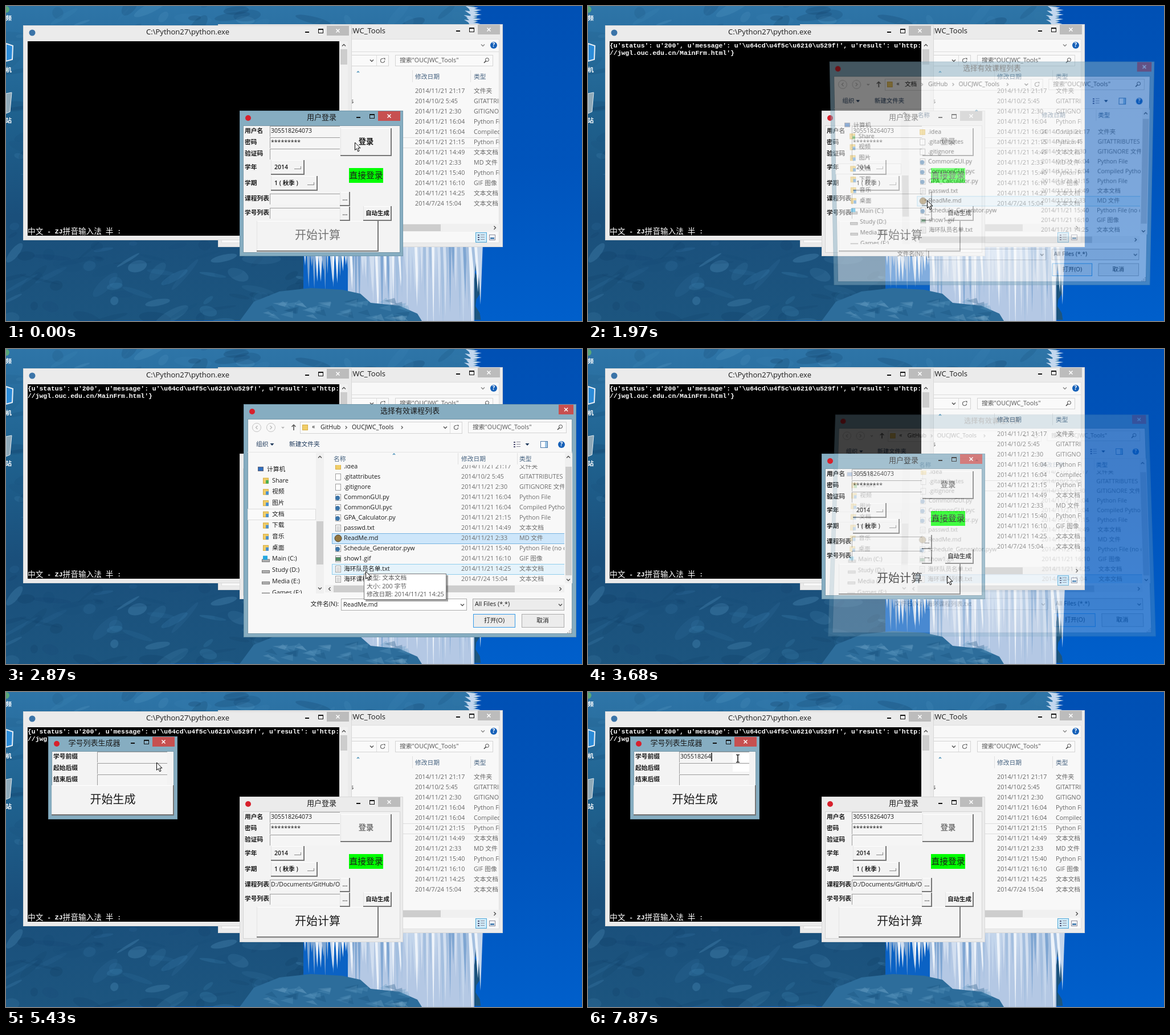
Write an HTML page with a canvas that moves like this. It is 1011 px wide and 554 px high and loops after 8000 ms.

```html
<!DOCTYPE html>
<html lang="zh">
<head>
<meta charset="utf-8">
<title>用户登录</title>
<style>
html, body { margin: 0; width: 100%; height: 100%; overflow: hidden; background: #0057c0; }
canvas { position: absolute; left: 0; top: 0; }
</style>
</head>
<body>
<script>
const W = 1011, H = 554, LOOP = 8000;
const UI = '"Open Sans", "Noto Sans CJK SC", sans-serif';
const MONO = '"Liberation Mono", "Noto Sans CJK SC", monospace';
const ACCENT = '#86adc1', FACE = '#f3f3f3', INK = '#1a1a1a';
const USER = '305518264073', PREFIX = USER.slice(0, 9);

// Bursts of picture changes: first time, last time, number of steps.
const BURSTS = [[0, 0, 1], [160, 700, 5], [1000, 1240, 3], [1390, 1660, 3], [1970, 2870, 8],
  [3020, 3680, 6], [3800, 3920, 2], [4070, 5000, 8], [5150, 5430, 3], [5580, 5860, 3],
  [6450, 6450, 1], [6730, 7720, 8], [7870, 7870, 1]];
const TICKS = BURSTS.flatMap(([from, to, n]) =>
  Array.from({ length: n }, (_, i) => from + (to - from) * i / Math.max(1, n - 1)));

// Pointer path: time, x, y.
const PATH = [[0, 612, 240], [1000, 610, 246], [1240, 588, 347], [1510, 594, 343], [1970, 595, 342],
  [2360, 597, 340], [2870, 631, 391], [3140, 630, 399], [4070, 630, 399], [4500, 648, 360],
  [5000, 648, 360], [5430, 264, 124], [5580, 263, 117], [LOOP, 263, 117]];

const FILES = [
  ['.idea', '2014/11/21 21:17', '文件夹', 'folder'],
  ['.gitattributes', '2014/10/2 5:45', 'GITATTRIBUTES 文件'],
  ['.gitignore', '2014/11/21 2:30', 'GITIGNORE 文件'],
  ['CommonGUI.py', '2014/11/21 16:04', 'Python File', '#3b74a8'],
  ['CommonGUI.pyc', '2014/11/21 16:04', 'Compiled Python File', '#3b74a8'],
  ['GPA_Calculator.py', '2014/11/21 21:15', 'Python File', '#3b74a8'],
  ['passwd.txt', '2014/11/21 14:49', '文本文档', 'lines'],
  ['ReadMe.md', '2014/11/21 2:33', 'MD 文件', 'ball'],
  ['Schedule_Generator.pyw', '2014/11/21 15:40', 'Python File (no console)', '#3b74a8'],
  ['show1.gif', '2014/11/21 16:10', 'GIF 图像', 'image'],
  ['海环队员名单.txt', '2014/11/21 14:25', '文本文档', 'lines'],
  ['海环课程列表.txt', '2014/7/24 15:04', '文本文档', 'lines']];
const PLACES = ['计算机', 'Share', '视频', '图片', '文档', '下载', '音乐', '桌面',
  'Main (C:)', 'Study (D:)', 'Media (E:)', 'Games (F:)'];

const clamp = v => Math.min(1, Math.max(0, v));
let g;
const [desk, consoleLayer, loginLayer, dialogLayer, makerLayer, pointerLayer] = Array.from({ length: 6 }, () => {
  const canvas = document.body.appendChild(document.createElement('canvas'));
  canvas.width = W;
  canvas.height = H;
  return canvas.getContext('2d');
});

function begin(layer) {
  g = layer;
  g.clearRect(0, 0, W, H);
  g.textBaseline = 'middle';
}
function text(str, x, y, { size = 10.75, color = INK, weight = 400, align = 'left', family = UI } = {}) {
  g.font = `${weight} ${size}px ${family}`;
  g.fillStyle = color;
  g.textAlign = align;
  g.fillText(str, x, y);
}
function box(x, y, x2, y2, fill, stroke) {
  if (fill) { g.fillStyle = fill; g.fillRect(x, y, x2 - x, y2 - y); }
  if (stroke) { g.strokeStyle = stroke; g.lineWidth = 1; g.strokeRect(x + .5, y + .5, x2 - x - 1, y2 - y - 1); }
}
function trace(points, stroke, fill, width = 1) {
  g.beginPath();
  points.forEach(([x, y]) => g.lineTo(x, y));
  if (fill) { g.closePath(); g.fillStyle = fill; g.fill(); }
  if (stroke) { g.strokeStyle = stroke; g.lineWidth = width; g.stroke(); }
}
function circle(x, y, r, fill, stroke) {
  g.beginPath();
  g.arc(x, y, r, 0, 7);
  if (fill) { g.fillStyle = fill; g.fill(); }
  if (stroke) { g.strokeStyle = stroke; g.lineWidth = 1; g.stroke(); }
}
function clipped(x, y, x2, y2, draw) {
  g.save();
  g.beginPath();
  g.rect(x, y, x2 - x, y2 - y);
  g.clip();
  draw();
  g.restore();
}
// Quarter turns: 0 down, 1 left, 2 up, 3 right.
function chevron(x, y, turn = 0, color = '#505050', size = 3) {
  g.save();
  g.translate(x, y);
  g.rotate(turn * Math.PI / 2);
  trace([[-size, -size / 2], [0, size / 2], [size, -size / 2]], color, null, 1.4);
  g.restore();
}
const dropMark = (x, y) => trace([[x - 3.5, y - 2], [x + 3.5, y - 2], [x, y + 2]], null, '#1e395b');
function magnifier(x, y) {
  circle(x + 1.5, y - 1.5, 3, null, '#444');
  trace([[x - .5, y + .5], [x - 4, y + 4]], '#444', null, 1.6);
}
function refresh(x, y) {
  g.beginPath();
  g.arc(x, y, 3.5, 0, 5);
  g.strokeStyle = '#666';
  g.lineWidth = 1.2;
  g.stroke();
  trace([[x + 1, y - 4.5], [x + 4.5, y - 4.5], [x + 4.5, y - 1]], null, '#666');
}
function help(x, y) {
  circle(x, y, 6, '#1560b8');
  text('?', x, y, { color: '#fff', weight: 700, size: 10, align: 'center' });
}
function searchBox(x, y, x2) {
  box(x, y, x2, y + 20, '#fafafa', '#d4d4d4');
  text('搜索"OUCJWC_Tools"', x + 8, y + 10, { color: '#555' });
  magnifier(x2 - 12, y + 10);
}
function listView(x, y) {
  for (let i = -1; i < 2; i++) {
    box(x - 6, y + i * 4 - 1, x - 3, y + i * 4 + 1, '#557');
    box(x - 1, y + i * 4 - 1, x + 6, y + i * 4, '#889');
  }
}

function frame(x, y, x2, y2, title, titleX, { active = true, icon, closeWidth = 39, size = 13 } = {}) {
  box(x, y, x2, y2, active ? ACCENT : '#ebebeb', active ? '#6f97ab' : '#d8d8d8');
  const left = x2 - 5 - closeWidth, mid = y + 9.5;
  box(left, y + 1, x2 - 5, y + 18, active ? '#c75050' : '#bcbcbc');
  const cx = left + closeWidth / 2;
  for (const d of [-3, 3]) trace([[cx - 3, mid - d], [cx + 3, mid + d]], '#fff', null, 1.5);
  if (closeWidth > 30) {
    box(left - 38, y + 11, left - 31, y + 13, '#111');
    box(left - 15, y + 6, left - 6, y + 14, null, '#111');
    box(left - 15, y + 6, left - 6, y + 8, '#111');
  }
  if (icon) circle(x + 15, y + 13, 5, icon);
  text(title, titleX, y + 13, { size, align: 'center' });
}
function raised(x, y, x2, y2, sunken) {
  box(x, y, x2, y2, FACE);
  box(x, y, x2, y + 1, sunken ? '#777' : '#fff');
  box(x, y, x + 1, y2, sunken ? '#777' : '#e4e4e4');
  if (sunken) return;
  box(x, y2 - 2, x2, y2, '#777');
  box(x2 - 2, y, x2, y2, '#777');
}
function button(x, y, x2, y2, label, style, sunken) {
  raised(x, y, x2, y2, sunken);
  text(label, (x + x2) / 2, (y + y2) / 2, { align: 'center', weight: 600, ...style });
}
function field(label, labelX, x, y, value = '') {
  text(label, labelX, y + 9, { weight: 600 });
  box(x, y, x + 123, y + 19, '#f5f5f5');
  box(x, y, x + 123, y + 1, '#9c9c9c');
  box(x, y, x + 1, y + 19, '#9c9c9c');
  clipped(x, y, x + 123, y + 19, () => text(value, x + 2, y + 9, { size: 10.5, weight: 500 }));
}
function option(label, y, x2, value) {
  text(label, 419, y + 13, { weight: 600 });
  raised(465, y, x2, y + 26);
  text(value, 471, y + 13, { weight: 600, size: 10.5 });
  box(x2 - 18, y + 11, x2 - 6, y + 16, '#888');
  box(x2 - 18, y + 11, x2 - 7, y + 15, FACE);
}

function drawBackdrop() {
  let seed = 11;
  const rnd = (a, b) => a + (b - a) * (seed = seed * 16807 % 2147483647) / 2147483647;
  const pick = list => list[Math.floor(rnd(0, list.length))];
  const fade = (stops, y2) => {
    const paint = g.createLinearGradient(0, 0, 0, y2);
    stops.forEach((c, i) => paint.addColorStop(i / (stops.length - 1), c));
    return paint;
  };
  box(0, 0, W, H, fade(['#0050b4', '#0054bc', '#005fcb'], H));
  const edge = [];
  for (let y = 0; y <= H; y += 12) edge.push([828 + rnd(-6, 6), y]);
  trace([[0, 0], ...edge, [0, H]], null, fade(['#2e75a8', '#1f628f', '#1a4f7b', '#1c557f'], H));
  for (let i = 0; i < 420; i++) {
    g.globalAlpha = rnd(.08, .28);
    g.fillStyle = pick(['#0f3d63', '#123f68', '#3d82b2', '#5a9cc6', '#174c78']);
    g.beginPath();
    g.ellipse(rnd(0, 800), rnd(0, H), rnd(5, 38), rnd(2, 11), rnd(-.9, .4), 0, 7);
    g.fill();
  }
  g.globalAlpha = 1;
  // Hanging ice beside the open sky.
  box(522, 424, 612, 510, '#0b62c4');
  box(600, 424, 822, H, '#b4c8e4');
  for (let x = 522; x < 830; x += 5) {
    const w = rnd(4, 11), tip = x < 605 ? rnd(455, 502) : rnd(470, 580);
    trace([[x, 424], [x + w, 424], [x + w * .6, tip]], null, pick(['#edf3fa', '#d2dff0', '#a4bfdf', '#7fa6d2', '#c3d5eb']));
  }
  for (let y = 0; y < 34; y += 4) trace([[808 + rnd(-5, 8), y], [833 + rnd(-5, 3), y + 3], [815, y + 7]], null, '#c3d7ee');
  trace([[410, H], [435, 520], [480, 502], [535, 496], [590, 499], [622, 506], [640, 522], [690, 527], [722, 541], [730, H]], null, '#2d6d9b');
  for (let i = 0; i < 40; i++) {
    const x = rnd(450, 690), y = rnd(518, 550);
    g.globalAlpha = .3;
    trace([[x, y], [x + rnd(8, 30), y - rnd(2, 8)], [x + 22, y + 6]], null, pick(['#174e7b', '#5c98c0', '#79adcd']));
  }
  g.globalAlpha = 1;

  circle(0, 6, 6, '#58a67a');
  trace([[0, 66], [12, 70], [11, 94], [0, 97]], '#e8eef4', '#2b8bd8', 2);
  trace([[0, 154], [10, 152], [7, 186], [0, 189]], '#dde8ee', '#8fa9b8');
  [['频', 22], ['机', 113], ['站', 202]].forEach(([s, y]) =>
    text(s, 10, y, { color: '#fff', weight: 600, align: 'right' }));
}

function drawExplorer() {
  frame(372, 32, 872, 424, '', 0, { active: false });
  text('OUCJWC_Tools', 666, 45, { size: 13, align: 'right', weight: 500 });
  box(378, 58, 866, 417, '#f8f8f8', '#e0e0e0');
  box(378, 80, 866, 81, '#dcdcdc');
  chevron(837, 69, 0, '#888');
  help(856, 69);
  box(400, 86, 672, 106, '#fafafa', '#d4d4d4');
  chevron(642, 96);
  box(650, 87, 651, 105, '#ddd');
  refresh(661, 96);
  searchBox(683, 86, 855);
  chevron(618, 116, 2, '#4a90b8', 2);
  [713, 815].forEach(x => box(x, 113, x + 1, 134, '#e0e0e0'));
  text('修改日期', 718, 125, { color: '#44617f' });
  text('类型', 821, 125, { color: '#44617f' });
  box(600, 231, 866, 250, null, '#dcdcdc');
  clipped(600, 134, 866, 360, () => FILES.forEach(([, date, type], i) => {
    text(date, 718, 150 + i * 18, { color: '#666' });
    text(type, 821, 150 + i * 18, { color: '#666' });
  }));
  text('s', 605, 168);
  box(600, 383, 866, 397, '#f0f0f0');
  box(600, 384, 763, 396, '#cdcdcd');
  chevron(858, 390, 3);
  box(824, 398, 844, 416, '#cfeaf8', '#50a8d8');
  listView(834, 407);
  box(848, 402, 859, 412, '#fff', '#889');
  box(850, 407, 857, 410, '#4a7fb0');
}

function drawConsoleWindow() {
  frame(30, 34, 607, 412, 'C:\\Python27\\python.exe', 319, { active: false });
  circle(46, 47, 5.5, '#3b74a8');
  box(38, 62, 585, 404, '#000');
  box(585, 62, 600, 404, '#f0f0f0');
  chevron(593, 69, 2);
  box(587, 76, 599, 103, '#cdcdcd');
}

// Console cells are half an ideograph wide.
function cells(str, y, weight) {
  const cell = 547 / 80;
  let col = 0;
  for (const ch of str) {
    const wide = ch > '\u2e80';
    text(ch, 38 + col * cell, y, { color: '#fff', family: MONO, size: wide ? cell * 2 : 11.4, weight: wide ? 400 : weight });
    col += wide ? 2 : 1;
  }
}
function drawConsole(t) {
  begin(consoleLayer);
  cells('中文 - ZJ拼音输入法 半 :', 397, 700);
  if (t < 425) return;
  cells("{u'status': u'200', u'message': u'\\u64cd\\u4f5c\\u6210\\u529f!', u'result': u'http:", 70, 700);
  cells("//jwgl.ouc.edu.cn/MainFrm.html'}", 83, 700);
}

function drawLogin(t) {
  begin(loginLayer);
  const done = t > 425, grey = '#747474';
  const active = t < 1650 || (t > 3660 && t < 5140);
  frame(410, 184, 697, 440, '用户登录', 554, { active, icon: '#d8202c' });
  box(416, 210, 692, 434, FACE, active ? '#7898a8' : '#d4d4d4');
  field('用户名', 419, 463, 211, USER);
  field('密码', 419, 463, 231, '*********');
  field('验证码', 419, 463, 251);
  button(587, 215, 677, 264, '登录', { size: 13.3, color: done ? grey : INK }, t > 150 && t < 290);
  option('学年', 271, 524, '2014');
  option('学期', 299, 547, '1 ( 秋季 )');
  box(602, 285, 662, 311, '#0f0');
  text('直接登录', 632, 299, { size: 14.8, align: 'center' });
  field('课程列表', 419, 463, 330, t > 4060 ? 'D:/Documents/GitHub/OUCJWC_Tools' : '');
  field('学号列表', 419, 463, 355);
  button(586, 327, 604, 352, '...', {}, t > 1380 && t < 1500);
  button(586, 353, 604, 378, '...');
  button(627, 352, 677, 378, '自动生成', { size: 10.4 }, t > 4450 && t < 4580);
  button(440, 378, 654, 432, '开始计算', { size: 20, weight: 400, color: done ? INK : grey });
}

function fileIcon(kind, x, y) {
  if (kind === 'folder') return box(x - 5, y - 5, x + 5, y + 5, '#f0cd68', '#d8ae44');
  if (kind === 'ball') return circle(x, y, 6, '#93763f', '#4a3c28');
  box(x - 5, y - 6, x + 5, y + 6, '#fff', '#a0a0a0');
  if (kind === 'image') box(x - 5, y - 3, x + 5, y + 4, '#4f8f63', '#777');
  else if (kind === 'lines') for (let i = -3; i < 5; i += 2) box(x - 3, y + i, x + 3, y + i + 1, '#bbb');
  else if (kind) circle(x - 1, y + 1, 4, kind);
}
function placeIcon(i, x, y) {
  if (i === 0) box(x - 5, y - 5, x + 5, y + 3, '#2f6fc0', '#667');
  else if (i < 8) { fileIcon('folder', x, y); box(x, y - 1, x + 5, y + 5, i === 1 ? '#4caf50' : '#4a90d0'); }
  else { box(x - 7, y, x + 7, y + 5, '#b4b4b4', '#777'); if (i === 8) box(x - 5, y - 6, x + 3, y + 1, '#25a8e0'); }
}

function drawDialog(t, pointerY) {
  begin(dialogLayer);
  const fresh = t < 2350, scroll = t < 2600 ? 0 : 17;
  const selected = fresh ? -1 : t < 3140 ? 7 : 11;
  const hover = Math.round((pointerY - 224 + scroll) / 18);
  const navy = { color: '#1e395b', weight: 500 };
  frame(417, 97, 1001, 507, '选择有效课程列表', 709, { icon: '#d8202c', closeWidth: 26 });
  box(424, 123, 994, 501, '#f8f8f8', '#7898a8');

  [[440, 1], [465, 3]].forEach(([x, turn]) => { circle(x, 138, 7.5, null, '#c4c4c4'); chevron(x, 138, turn, '#bbb'); });
  chevron(486, 138, 0, '#aaa', 2);
  trace([[505, 143], [505, 134]], '#555', null, 1.6);
  chevron(505, 135, 2, '#555', 3.5);
  box(516, 128, 801, 149, '#fafafa', '#d4d4d4');
  fileIcon('folder', 525, 138);
  text('«', 537, 137);
  const crumbs = fresh ? [['文档', 552, 583], ['GitHub', 594, 639], ['OUCJWC_Tools', 649, 737]]
    : [['GitHub', 552, 597], ['OUCJWC_Tools', 607, 695]];
  crumbs.forEach(([name, x, mark]) => { text(name, x, 138); chevron(mark, 138, 3, '#666', 2.5); });
  chevron(771, 138);
  box(779, 129, 780, 148, '#ddd');
  refresh(790, 138);
  searchBox(811, 128, 984);

  text('组织', 439, 168, navy);
  dropMark(467, 168);
  text('新建文件夹', 497, 168, navy);
  listView(897, 168);
  dropMark(915, 168);
  box(938, 162, 951, 174, '#fff', '#4a78a8');
  box(946, 163, 950, 173, '#9cc4e4');
  help(975, 168);
  box(424, 181, 994, 182, '#e4e4e4');

  box(424, 281, 544, 301, '#fafafa', '#dcdcdc');
  clipped(424, 183, 544, 430, () => PLACES.forEach((name, i) => {
    const y = 212 + i * 19.7;
    placeIcon(i, i ? 456 : 447, y);
    text(name, i ? 467 : 458, y);
  }));
  box(544, 183, 558, 430, '#f0f0f0');
  box(545, 303, 557, 379, '#cdcdcd');
  chevron(551, 190, 2);
  chevron(551, 421);

  clipped(572, 204, 980, 412, () => FILES.forEach(([name, date, type, kind], i) => {
    const y = 224 + i * 18 - scroll;
    if (i === selected) box(572, y - 9, 990, y + 10, '#cde6fa', '#78b4e0');
    else if (i === hover) box(572, y - 9, 990, y + 10, '#e5f3fb', '#90cdec');
    fileIcon(kind, 583, y);
    text(name, 593, y);
    text(date, 799, y, { color: '#6d6d6d' });
    text(type, 901, y, { color: '#6d6d6d' });
  }));
  [['名称', 575], ['修改日期', 799], ['类型', 901]].forEach(([s, x]) => text(s, x, 194, { color: '#44617f' }));
  [793, 897].forEach(x => box(x, 183, x + 1, 203, '#e0e0e0'));
  chevron(681, 185, 2, '#4a90b8', 2);
  box(981, 183, 994, 412, '#f0f0f0');
  box(982, fresh ? 200 : 207, 993, fresh ? 392 : 398, '#cdcdcd');
  chevron(987, 190, 2);
  chevron(987, 406);
  box(560, 415, 980, 428, '#f0f0f0');
  box(575, 416, 893, 428, '#cdcdcd');
  chevron(568, 422, 1);
  chevron(973, 422, 3);

  text('文件名(N):', 584, 449, { align: 'right' });
  box(588, 439, 809, 460, '#fff', '#ababab');
  text(fresh ? '' : FILES[selected][0], 592, 450);
  if (fresh) box(592, 443, 593, 456, '#000');
  chevron(801, 450);
  box(819, 439, 980, 460, '#ececec', '#ababab');
  text('All Files (*.*)', 823, 449);
  chevron(973, 450);
  box(820, 466, 894, 490, '#ececec', '#3399e8');
  text('打开(O)', 857, 478, { align: 'center' });
  box(905, 466, 980, 490, '#ececec', '#ababab');
  text('取消', 942, 478, { align: 'center' });
  for (let i = 0; i < 3; i++) for (let j = 0; j <= i; j++) box(991 - j * 3, 492 + i * 3, 993 - j * 3, 494 + i * 3, '#bbb');

  if (t > 2860 && t < 3010) {
    box(631, 398, 776, 444, 'rgba(0,0,0,.35)');
    box(628, 395, 773, 441, '#fff', '#767676');
    ['类型: 文本文档', '大小: 200 字节', '修改日期: 2014/11/21 14:25'].forEach((s, i) =>
      text(s, 633, 403.5 + i * 14.3, { color: '#575757' }));
  }
}

function drawMaker(t) {
  begin(makerLayer);
  const typed = t < 6730 ? 0 : 1 + Math.floor((t - 6729) / 141.4);
  frame(74, 78, 301, 224, '学号列表生成器', 155, { icon: '#d8202c' });
  box(80, 104, 295, 218, FACE, '#7898a8');
  field('学号前缀', 83, 160, 105, PREFIX.slice(0, typed));
  const caret = 161 + g.measureText(PREFIX.slice(0, typed)).width;
  field('起始后缀', 83, 160, 125);
  field('结束后缀', 83, 160, 145);
  if (t > 5570) {
    box(254, 107, 283, 124, '#fff');
    box(254, 126, 283, 140, '#fff');
  }
  if (t > 5850 && !(t > 6440 && t < 6720)) box(caret, 107, caret + 1.5, 122, '#000');
  button(80, 164, 295, 217, '开始生成', { size: 20, weight: 400 });
}

function pointerAt(t) {
  const i = Math.max(1, PATH.findIndex(([time]) => time > t));
  const [t0, x0, y0] = PATH[i - 1], [t1, x1, y1] = PATH[i];
  const k = (t - t0) / (t1 - t0);
  return [x0 + (x1 - x0) * k, y0 + (y1 - y0) * k];
}
function drawPointer(t, x, y) {
  begin(pointerLayer);
  if (t > 5570) {
    trace([[x, y - 6], [x, y + 6]], '#000', null, 1.4);
    for (const d of [-6.5, 6.5]) trace([[x - 3, y + d], [x + 3, y + d]], '#000', null, 1.2);
    return;
  }
  g.save();
  g.translate(x + .5, y);
  trace([[0, 0], [0, 13.5], [3, 10.7], [5.2, 15.8], [7.5, 14.8], [5.3, 9.8], [9.5, 9.8]], '#000', '#fff');
  g.restore();
}

// Windows swing in from above and swing away downwards.
function pose(layer, origin, opened, closed = 0) {
  const shut = 1 - opened, style = layer.canvas.style;
  style.transformOrigin = origin;
  style.opacity = opened * (1 - closed);
  style.transform = shut || closed
    ? `translateY(${5.4 * closed - 10 * shut}px) perspective(1400px) scale(${1 - .074 * shut - .05 * closed}) rotateX(${12 * closed - 11 * shut}deg)`
    : 'none';
}

function render(t) {
  const [x, y] = pointerAt(t);
  drawConsole(t);
  drawLogin(t);
  drawDialog(t, y);
  drawMaker(t);
  drawPointer(t, x, y);
  pose(dialogLayer, '709px 302px', clamp((t - 1840) / 259), clamp((t - 3480) / 270));
  pose(makerLayer, '187px 151px', clamp((t - 4640) / 260));
}

begin(desk);
drawBackdrop();
drawExplorer();
drawConsoleWindow();

let shown = -1;
function tick() {
  const now = performance.now() % LOOP;
  const t = TICKS.filter(time => time <= now + .01).pop();
  if (t !== shown) render(shown = t);
  requestAnimationFrame(tick);
}
tick();
</script>
</body>
</html>
```
